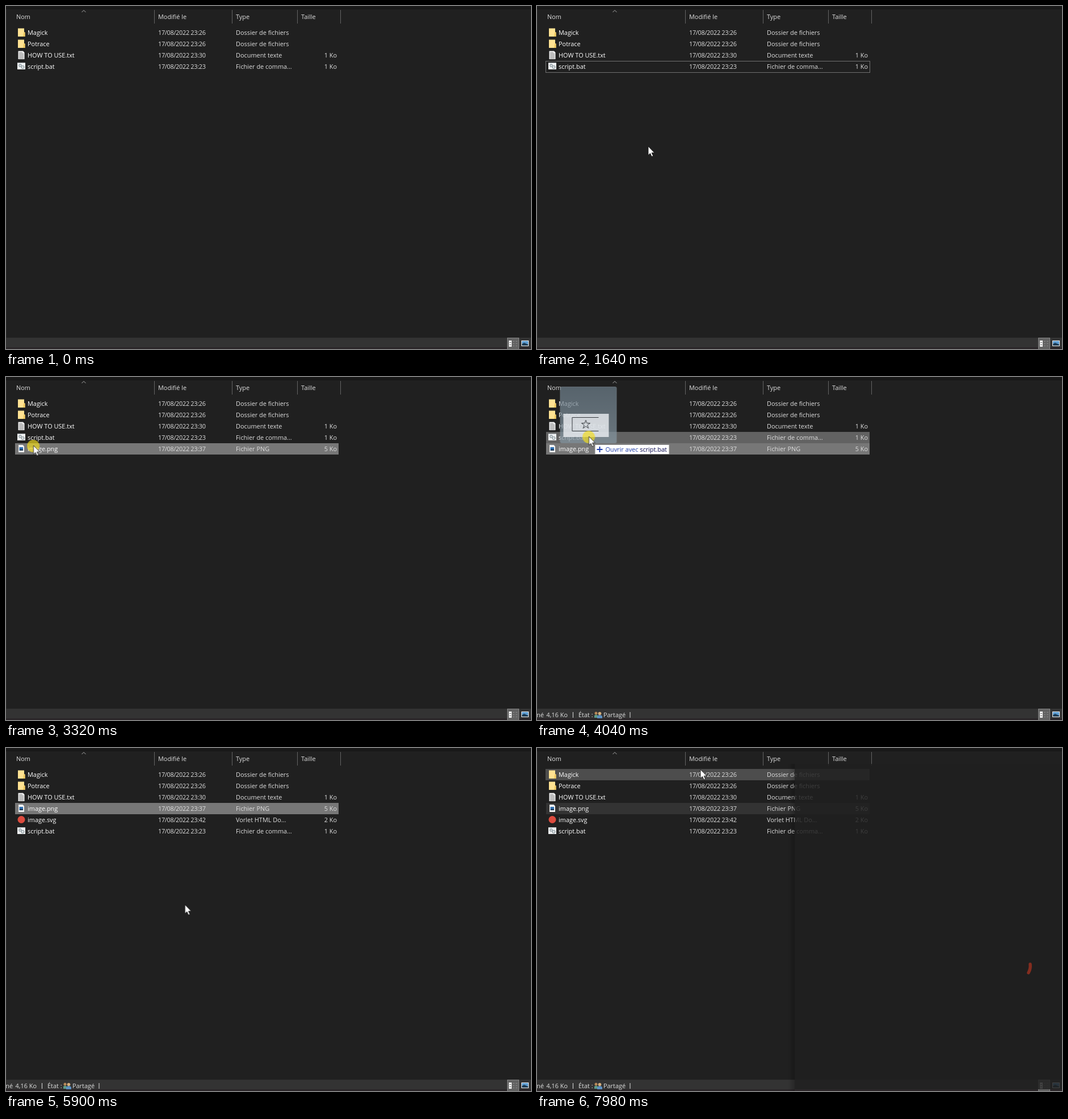
Animation, 925 px wide and 606 px high, one loop 8000 ms. Source, as an HTML page:

```html
<!DOCTYPE html>
<html lang="fr">
<head>
<meta charset="utf-8">
<title>Explorateur</title>
<style>
html, body { margin: 0; height: 100%; overflow: hidden; background: #202020; }
svg { display: block; width: 100vw; height: 100vh; }
text { font: 10.9px "Open Sans", "Noto Sans", sans-serif; fill: #dedede; white-space: pre; font-variant-ligatures: none; }
.name { fill: #fff; }
.date { letter-spacing: -.3px; }
.size, .end { text-anchor: end; }

/* 1% = 80 ms */
.anim { animation: 8s step-end infinite; }
#cursor { animation-name: cursor; animation-timing-function: linear; }
#hover { animation-name: hover; }
#selected { animation-name: selected; }
#focus { animation-name: focus; }
#target { animation-name: target; }
#png { animation-name: png; }
#svg { animation-name: svg; }
#bat { animation-name: bat; }
#status { animation-name: status; }
#console { animation-name: console; animation-timing-function: linear; }
#press { animation-name: press; }
#ghost { animation-name: ghost; }
#tip { animation-name: tip; }
#viewer { animation-name: viewer; animation-timing-function: linear; }

@keyframes cursor {
  0%, 6.25% { transform: translate(548px, 608px); }
  10% { transform: translate(300px, 400px); animation-timing-function: ease-out; }
  12.2% { transform: translate(150px, 234px); animation-timing-function: ease-in-out; }
  13.625%, 20.5% { transform: translate(196px, 248px); animation-timing-function: ease-in-out; }
  25% { transform: translate(214px, 338px); }
  30.5% { transform: translate(216px, 312px); animation-timing-function: ease-in-out; }
  39.125%, 42.75% { transform: translate(48.5px, 121px); animation-timing-function: ease-in-out; }
  50%, 55.875% { transform: translate(91.5px, 105px); animation-timing-function: ease-out; }
  59.25%, 60.5% { transform: translate(142px, 110px); }
  65.75% { transform: translate(192px, 187px); animation-timing-function: ease-out; }
  73.75% { transform: translate(315px, 277px); }
  75% { transform: translate(349px, 266px); }
  76% { transform: translate(346px, 232px); animation-timing-function: ease-in-out; }
  83.375%, 92.625% { transform: translate(118px, 107px); }
  99.75%, 100% { transform: translate(288px, 38px); }
}
@keyframes hover {
  0% { opacity: 0; transform: translateY(117px); }
  37% { opacity: 1; transform: translateY(117px); }
  41.5% { opacity: 0; transform: translateY(117px); }
  61% { opacity: 1; transform: translateY(117px); }
  62.35% { opacity: 1; transform: translateY(137px); }
  63.7% { opacity: 0; transform: translateY(137px); }
  80.2% { opacity: 1; transform: translateY(137px); }
  81% { opacity: 1; transform: translateY(117px); }
  82% { opacity: 0; transform: translateY(117px); }
  93.65% { opacity: 1; transform: translateY(77px); }
  95.7% { opacity: 1; transform: translateY(57px); }
  97.8%, 100% { opacity: 1; transform: translateY(37px); }
}
@keyframes selected {
  0%, 30.25% { opacity: 0; fill: #777; transform: translateY(117px); }
  23.75%, 41.5% { opacity: 1; fill: #777; transform: translateY(117px); }
  55.875% { opacity: 1; fill: #333; transform: translateY(117px); }
  60.5% { opacity: 1; fill: #777; transform: translateY(97px); }
  97.5%, 100% { opacity: 1; fill: #333; transform: translateY(97px); }
}
@keyframes focus {
  0%, 23.75%, 41.5%, 100% { opacity: 0; transform: translateY(117px); }
  17.875% { opacity: 1; transform: translateY(97px); }
  30.25% { opacity: 1; transform: translateY(117px); }
}
@keyframes target { 0%, 55.875%, 100% { opacity: 0; } 45.5% { opacity: 1; } }
@keyframes png {
  0% { opacity: 0; transform: translateY(127px); }
  23.75% { opacity: 1; transform: translateY(127px); }
  60.5%, 100% { opacity: 1; transform: translateY(107px); }
}
@keyframes svg { 0% { opacity: 0; } 60.5%, 100% { opacity: 1; } }
@keyframes bat { 0% { transform: translateY(107px); } 60.5%, 100% { transform: translateY(147px); } }
@keyframes status { 0%, 30% { opacity: 0; } 24.4%, 42.75%, 100% { opacity: 1; } }
@keyframes console { 0%, 55.8%, 59%, 100% { opacity: 0; } 56.5%, 58.25% { opacity: 1; } }
@keyframes press {
  0%, 18.25%, 51.5%, 86.75%, 89.75%, 100% { opacity: 0; }
  17.875%, 41.5%, 85.625%, 88.25% { opacity: 1; }
}
@keyframes ghost {
  0%, 52.25%, 100% { opacity: 0; }
  43.5% { opacity: 1; }
  51.7% { opacity: 1; animation-timing-function: linear; }
}
@keyframes tip { 0%, 52.25%, 100% { opacity: 0; } 45.5% { opacity: 1; } }
@keyframes viewer { 0%, 98.6% { opacity: 0; } 99.75%, 100% { opacity: .84; } }
</style>
</head>
<body>
<svg viewBox="0 0 925 606" preserveAspectRatio="none">
  <defs>
    <g id="folder">
      <path d="M21 -7.5H32V-1L33.5 0V7H21Z" fill="#ffe292"/>
      <path d="M31 0L33.5 -1V7H30Z" fill="#f0c95f"/>
    </g>
    <g id="page">
      <path d="M21.500 -7.500H30L32.500 -5V7H21.500Z" fill="#ededed"/>
      <path d="M23 -4.500H29M23 -2.500H31M23 -.5H31M23 1.500H31M23 3.500H31M23 5.500H31" stroke="#8c8c8c"/>
    </g>
    <g id="gears">
      <path d="M20 -7H34V5H20Z" fill="#eef0f1"/>
      <path d="M20 -6.500H34" stroke="#b9c0c4"/>
      <g fill="none" stroke="#8d9ba1" stroke-width="1.300">
        <circle cx="25" cy="-2" r="2"/><circle cx="29.500" cy="1" r="2.300"/>
      </g>
    </g>
    <g id="picture">
      <path d="M22 -7H29.500L32 -4.500V6H22Z" fill="#f2f2f2"/>
      <path d="M23.500 -3H30V3H23.500Z" fill="#2f6fb2"/>
      <path d="M23.500 3L26 0L28 1.500L30 0V3Z" fill="#17324d"/>
    </g>
    <linearGradient id="shade">
      <stop stop-opacity="0"/><stop offset="1" stop-opacity=".25"/>
    </linearGradient>
    <linearGradient id="glass" x2="0" y2="1">
      <stop stop-color="#6d7e8a" stop-opacity=".72"/>
      <stop offset="1" stop-color="#8798a3" stop-opacity=".72"/>
    </linearGradient>
  </defs>

  <rect width="925" height="606" fill="#202020"/>
  <rect width="925" height="6" fill="#191919"/>
  <path d="M.5 6V586" stroke="#2b2b2b"/>

  <!-- column headers -->
  <path d="M261.500 7V31M398.500 7V31M513.500 7V31M589.500 7V31" stroke="#636363"/>
  <path d="M133.500 11L137 7.500L140.500 11" fill="none" stroke="#aaa"/>
  <text y="23"><tspan x="18">Nom</tspan><tspan x="268">Modifié le</tspan><tspan x="405">Type</tspan><tspan x="520">Taille</tspan></text>

  <!-- row backgrounds -->
  <rect id="hover" class="anim" x="15" width="571" height="20" fill="#4d4d4d"/>
  <rect id="selected" class="anim" x="16" width="570" height="20"/>
  <rect id="target" class="anim" x="16" y="97" width="570" height="20" fill="#626262"/>
  <rect id="focus" class="anim" x="15.500" y=".5" width="571" height="20" fill="none" stroke="#707070"/>

  <!-- files -->
  <g transform="translate(0 47)">
    <use href="#folder"/>
    <text y="4"><tspan class="name" x="38">Magick</tspan><tspan class="date" x="268">17/08/2022 23:26</tspan><tspan x="405">Dossier de fichiers</tspan></text>
  </g>
  <g transform="translate(0 67)">
    <use href="#folder"/>
    <text y="4"><tspan class="name" x="38">Potrace</tspan><tspan class="date" x="268">17/08/2022 23:26</tspan><tspan x="405">Dossier de fichiers</tspan></text>
  </g>
  <g transform="translate(0 87)">
    <use href="#page"/>
    <text y="4"><tspan class="name" x="38">HOW TO USE.txt</tspan><tspan class="date" x="268">17/08/2022 23:30</tspan><tspan x="405">Document texte</tspan><tspan class="size" x="583">1 Ko</tspan></text>
  </g>
  <g id="bat" class="anim">
    <use href="#gears"/>
    <text y="4"><tspan class="name" x="38">script.bat</tspan><tspan class="date" x="268">17/08/2022 23:23</tspan><tspan x="405">Fichier de comma...</tspan><tspan class="size" x="583">1 Ko</tspan></text>
  </g>
  <g id="png" class="anim">
    <use href="#picture"/>
    <text y="4"><tspan class="name" x="38">image.png</tspan><tspan class="date" x="268">17/08/2022 23:37</tspan><tspan x="405">Fichier PNG</tspan><tspan class="size" x="583">5 Ko</tspan></text>
  </g>
  <g transform="translate(0 127)">
    <g id="svg" class="anim">
      <circle cx="27" cy="-.5" r="6.500" fill="#dd4b3e"/>
      <text y="4"><tspan class="name" x="38">image.svg</tspan><tspan class="date" x="268">17/08/2022 23:42</tspan><tspan x="405">Vorlet HTML Do...</tspan><tspan class="size" x="583">2 Ko</tspan></text>
    </g>
  </g>

  <!-- status bar -->
  <rect y="586" width="925" height="17" fill="#333"/>
  <rect y="603" width="925" height="3" fill="#2b2629"/>
  <g id="status" class="anim">
    <text y="601"><tspan class="end" x="12">1 élément sélectionné</tspan><tspan class="end" x="54">4,16 Ko</tspan><tspan x="73">État :</tspan><tspan x="117">Partagé</tspan></text>
    <path d="M63.500 592V602M164 592V602" stroke="#dedede"/>
    <path d="M101 602V598Q104 595 107 598V602Z" fill="#5f9a86"/>
    <path d="M106 603V599Q110.500 595 115 599V603Z" fill="#5c8fc0"/>
    <circle cx="104" cy="594" r="2.500" fill="#b98a5a"/>
    <circle cx="110.500" cy="594.500" r="2.800" fill="#d5ae7c"/>
  </g>
  <rect x="883.500" y="586.500" width="20" height="20" fill="#626262" stroke="#858585"/>
  <path d="M886 591H891V602H886Z" fill="#eee"/>
  <path d="M887 594.500H890M887 598.500H890" stroke="#777"/>
  <path d="M893 592.500H896M898 592.500H901M893 596.500H896M898 596.500H901M893 600.500H896M898 600.500H901" stroke="#858585"/>
  <rect x="908.500" y="591.500" width="12" height="9" fill="#5b9bd0" stroke="#f0f0f0"/>
  <path d="M909 600V597L913 595L920 598V600Z" fill="#1f3d55"/>

  <rect id="console" class="anim" width="860" height="432" fill="#0c0c0c"/>

  <!-- window opening on the right -->
  <g id="viewer" class="anim">
    <rect x="443" y="28" width="11" height="578" fill="url(#shade)"/>
    <rect x="454" y="28" width="471" height="575" fill="#1f1f1f"/>
    <path d="M869 382Q870 390 866 397" fill="none" stroke="#98301f" stroke-width="5.500" stroke-linecap="round"/>
  </g>

  <g id="cursor" class="anim">
    <g id="ghost" class="anim">
      <rect x="-50.500" y="-87.500" width="99" height="99" rx="2" fill="url(#glass)" stroke="#8796a0" stroke-opacity=".5"/>
      <rect x="-45" y="-40" width="80" height="41" fill="#f0f2f6" fill-opacity=".78"/>
      <g fill="none" stroke="#33373c">
        <path d="M17 -33.500H-29.500V-9.500H17"/>
        <path transform="translate(-5.500 -21)" d="M0 -8L1.800 -2.500L7.600 -2.500L2.900 1L4.700 6.500L0 3.100L-4.700 6.500L-2.900 1L-7.600 -2.500L-1.800 -2.500Z"/>
      </g>
    </g>
    <g id="tip" class="anim">
      <rect x="10.500" y="14.500" width="131" height="17" fill="#fff" stroke="#888"/>
      <path d="M14 23H24M19 18V28" stroke="#1f3fae" stroke-width="2"/>
      <text x="29" y="27" style="fill:#1c3ba8">Ouvrir avec <tspan fill="#00004a">script.bat</tspan></text>
    </g>
    <circle id="press" class="anim" cx="-.5" cy="1" r="11" fill="#f2dc1e" fill-opacity=".68"/>
    <path d="M0 0V15.500L3.500 12.300L6 18L8.600 16.900L6.100 11.300H10.800Z" fill="#fff" stroke="#111" stroke-width=".8"/>
  </g>
</svg>
</body>
</html>
```
